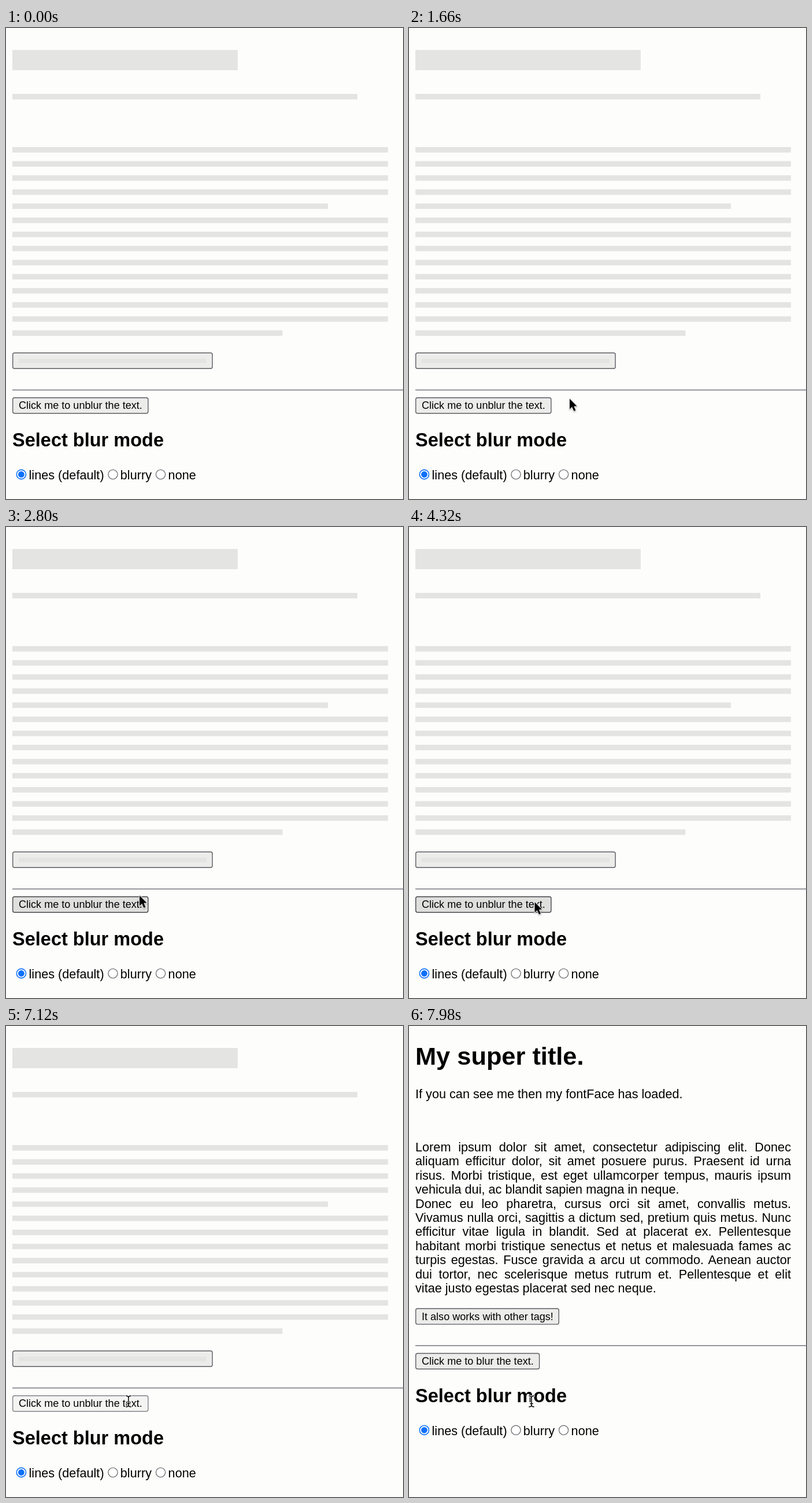
An HTML page that plays this animation: 687 by 815 pixels, repeating every 8000 ms.

```html
<!DOCTYPE html>
<html lang="en">
<head>
<meta charset="utf-8">
<title>Blur mode demo</title>
<style>
  html, body { margin: 0; width: 100%; height: 100%; overflow: hidden; background: #fdfdfc; }
  body { position: relative; color: #000; font: 21.68px/24.4px "Liberation Sans", Arial, sans-serif; }
  svg { position: absolute; left: 0; top: 0; display: block; }

  .title { font-size: 43.36px; font-weight: bold; }
  .sub { font-size: 32.52px; font-weight: bold; }
  .label { font-size: 18.07px; }
  .bar { fill: #e4e4e3; }
  .btn { fill: #ececeb; stroke: #5c5c62; stroke-width: 1.4; }
  .rule { stroke: #85858d; stroke-width: 1.7; }
  .radio { fill: #fff; stroke: #737378; stroke-width: 1.35; }
  .radio.on { stroke: #0c70fa; stroke-width: 1.6; }
  .dot { fill: #0c70fa; }

  .copy { position: absolute; left: 11px; top: 197.9px; width: 650px; }
  .copy p { margin: 0; }
  .full { text-align-last: justify; }

  .masked { animation: masked 8s step-end infinite; }
  .clear { visibility: hidden; animation: clear 8s step-end infinite; }
  .panel { animation: panel 8s step-end infinite; }
  .toggle { animation: toggle 8s step-end infinite; }
  .arrow { animation: move 8s linear infinite, arrow 8s step-end infinite; }
  .beam { visibility: hidden; animation: beam 8s step-end infinite; }
  .arrow path, .beam path { stroke-linejoin: round; }
  .arrow path { filter: drop-shadow(0 1.5px 1.2px rgba(0, 0, 0, .3)); }

  @keyframes masked { 0% { visibility: visible; } 89.25%, 100% { visibility: hidden; } }
  @keyframes clear { 0% { visibility: hidden; } 89.25%, 100% { visibility: visible; } }
  @keyframes panel {
    0% { transform: none; }
    89.25%, 100% { transform: translateY(-73.2px); }
  }
  @keyframes toggle {
    0% { fill: #ececeb; stroke: #5c5c62; }
    34.25% { fill: #dfdfdd; stroke: #45454a; }
    87.75% { fill: #f4f4f3; stroke: #828289; }
    89.25%, 100% { fill: #ececeb; stroke: #5c5c62; }
  }
  @keyframes arrow { 0% { visibility: visible; } 88.75%, 100% { visibility: hidden; } }
  @keyframes beam { 0% { visibility: hidden; } 88.75%, 100% { visibility: visible; } }
  @keyframes move {
    0%, 13.75% { transform: translate(446px, 820px); }
    16% { transform: translate(398px, 764px); }
    18% { transform: translate(336px, 700px); }
    19.5% { transform: translate(298px, 661px); }
    20.75% { transform: translate(277px, 640.5px); }
    23% { transform: translate(260px, 624px); }
    26% { transform: translate(250px, 617px); }
    31.25% { transform: translate(246px, 619px); }
    33% { transform: translate(238px, 628px); }
    35% { transform: translate(230px, 636.5px); }
    38% { transform: translate(223px, 643px); }
    42% { transform: translate(219px, 647px); }
    54% { transform: translate(216.5px, 648px); }
    61% { transform: translate(213.5px, 647.5px); }
    68.5%, 100% { transform: translate(210.5px, 646.5px); }
  }
</style>
</head>
<body>
<svg width="687" height="815" viewBox="0 0 687 815">
  <g class="masked">
    <rect class="bar" x="11" y="38" width="390" height="35"/>
    <rect class="bar" x="11" y="114" width="597" height="9.5"/>
    <g id="lines"></g>
    <rect class="btn" x="11.7" y="562.2" width="345.4" height="27.1" rx="3"/>
    <rect class="bar" x="22" y="572.5" width="325" height="7.5"/>
  </g>

  <g class="clear">
    <text class="title" x="11" y="67">My super title.</text>
    <text x="11" y="125.2">If you can see me then my fontFace has loaded.</text>
    <rect class="btn" x="11.7" y="489" width="247.6" height="27.1" rx="3"/>
    <text class="label" x="22" y="509">It also works with other tags!</text>
  </g>

  <g class="panel">
    <path class="rule" d="M11 626.3H687"/>
    <g class="masked">
      <rect class="btn toggle" x="11.7" y="639.7" width="234.2" height="27" rx="3"/>
      <text class="label" x="22" y="659.3">Click me to unblur the text.</text>
    </g>
    <g class="clear">
      <rect class="btn" x="11.7" y="639.7" width="213.9" height="27" rx="3"/>
      <text class="label" x="22" y="659.3">Click me to blur the text.</text>
    </g>
    <text class="sub" x="11" y="724">Select blur mode</text>
    <circle class="radio on" cx="26.4" cy="772.5" r="8.1"/>
    <circle class="dot" cx="26.4" cy="772.5" r="5.4"/>
    <text x="39.5" y="781.2">lines (default)</text>
    <circle class="radio" cx="185" cy="772.5" r="8.1"/>
    <text x="197.8" y="781.2">blurry</text>
    <circle class="radio" cx="267.6" cy="772.5" r="8.1"/>
    <text x="280.6" y="781.2">none</text>
  </g>
</svg>

<div class="copy clear">
  <p class="full">Lorem ipsum dolor sit amet, consectetur adipiscing elit. Donec<br>
    aliquam efficitur dolor, sit amet posuere purus. Praesent id urna<br>
    risus. Morbi tristique, est eget ullamcorper tempus, mauris ipsum</p>
  <p>vehicula dui, ac blandit sapien magna in neque.</p>
  <p class="full">Donec eu leo pharetra, cursus orci sit amet, convallis metus.<br>
    Vivamus nulla orci, sagittis a dictum sed, pretium quis metus. Nunc<br>
    efficitur vitae ligula in blandit. Sed at placerat ex. Pellentesque<br>
    habitant morbi tristique senectus et netus et malesuada fames ac<br>
    turpis egestas. Fusce gravida a arcu ut commodo. Aenean auctor<br>
    dui tortor, nec scelerisque metus rutrum et. Pellentesque et elit</p>
  <p>vitae justo egestas placerat sed nec neque.</p>
</div>

<svg width="687" height="815" viewBox="0 0 687 815">
  <g class="arrow">
    <path d="M1 1V19.2L5.2 15.2L8.5 22.6L11.6 21.3L8.4 13.9H13.8Z" stroke="#fff" stroke-width="2" paint-order="stroke"/>
  </g>
  <g class="beam" fill="none" stroke-linecap="round">
    <path id="caret" d="M207.8 640Q212 640 212 643.5V655.5Q212 659 207.8 659M216.2 640Q212 640 212 643.5M212 655.5Q212 659 216.2 659M209.8 653.5H214.2" stroke="#fff" stroke-width="3.4"/>
    <use href="#caret" style="display:none"/>
    <path d="M207.8 640Q212 640 212 643.5V655.5Q212 659 207.8 659M216.2 640Q212 640 212 643.5M212 655.5Q212 659 216.2 659M209.8 653.5H214.2" stroke="#000" stroke-width="1.5"/>
  </g>
</svg>

<script>
  const short = { 4: 546, 13: 467.5 };
  document.getElementById('lines').innerHTML = Array.from({ length: 14 }, (_, i) =>
    `<rect class="bar" x="11" y="${206 + 24.4 * i}" width="${short[i] || 650}" height="9.5"/>`
  ).join('');
</script>
</body>
</html>
```
